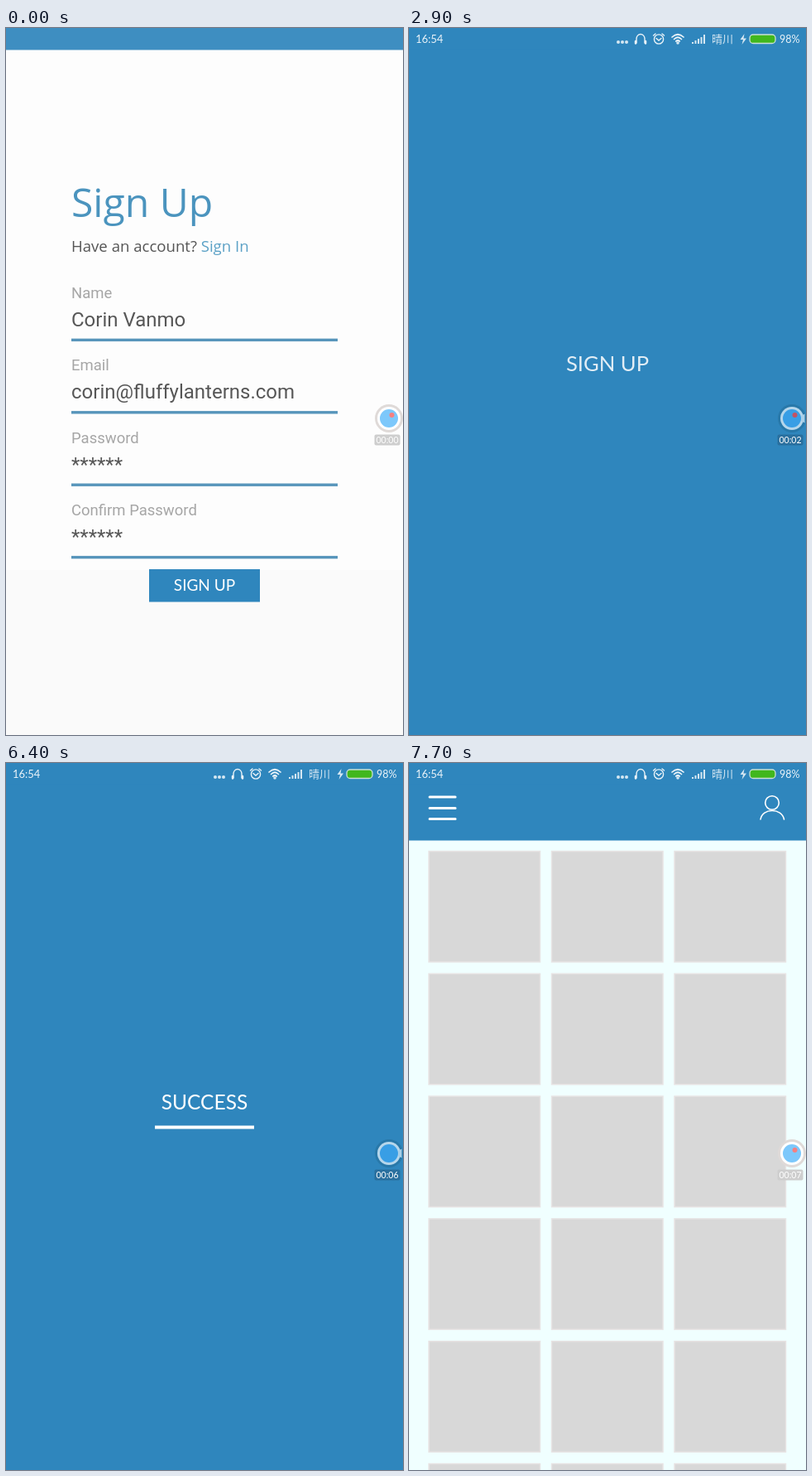
Animation, 480 px wide and 853 px high, one loop 7.8 s. Source, as an HTML page:

```html
<!DOCTYPE html>
<html lang="en">
<head>
<meta charset="utf-8">
<title>Sign up flow</title>
<style>
html, body { margin: 0; width: 100%; height: 100%; overflow: hidden; background: #fdfdfd; }
svg { display: block; width: 100%; height: 100%; }
text { white-space: pre; }
.ui { font-family: Lato, "Open Sans", sans-serif; fill: #fff; }
.head { font-family: "Open Sans", "Noto Sans", sans-serif; }
.field { font-family: Roboto, sans-serif; }
.mid { text-anchor: middle; }
.line { fill: none; stroke: #fff; stroke-linecap: round; }
</style>
</head>
<body>
<svg id="stage" viewBox="0 0 480 853">
  <rect id="back" width="480" height="853"/>
  <g id="tiles" fill="#d8d8d8" stroke="#e7e3e3" stroke-width="1.5"></g>

  <g id="form">
    <rect width="480" height="654" fill="#fdfdfd"/>
    <text class="head" x="79" y="228" font-size="48" fill="#4b94be">Sign Up</text>
    <text class="head" x="79" y="270" font-size="18.6" fill="#555">Have an account? <tspan fill="#5ba1c6">Sign In</tspan></text>
  </g>

  <rect id="button" fill="#2f86bd"/>
  <text id="buttonText" class="ui mid" x="240" y="679" font-size="19">SIGN UP</text>
  <rect id="panel" width="480" fill="#2f86bd"/>

  <g id="loading">
    <text id="signing" class="ui mid" font-size="24.5">SIGN UP</text>
    <text id="success" class="ui mid" x="240" y="418" font-size="24.5">SUCCESS</text>
    <rect id="bar" x="180" y="437.5" height="4" fill="#fff"/>
  </g>

  <g id="nav" class="line">
    <path d="M25 41H56M25 54.500H56M25 67.500H56" stroke-width="3"/>
    <circle cx="439" cy="48" r="8.300" stroke-width="1.600"/>
    <path d="M425 68C427 54 451 54 453.500 68" stroke-width="1.600"/>
  </g>

  <rect id="statusBar" width="480" height="26.5"/>
  <g id="status">
    <text class="ui" x="8" y="18" font-size="13">16:54</text>
    <g fill="#e8f2f8">
      <circle cx="253" cy="17" r="2"/><circle cx="258" cy="17" r="2"/><circle cx="263" cy="17" r="2"/>
      <path d="M405.500 7L400.500 14H404L402.500 20L408 12.500H404.500Z"/>
      <path d="M342 19v-2h2v2zM345.500 19v-4h2v4zM349 19v-6h2v6zM352.500 19v-8h2v8zM356 19v-11h2v11z"/>
      <circle cx="325" cy="18" r="1.800"/>
    </g>
    <g class="line" stroke-width="1.400">
      <path d="M275 18V13A5 5.500 0 0 1 285 13V18"/>
      <path d="M274 16V18.500M286 16V18.500" stroke-width="2.500"/>
      <circle cx="302" cy="13.500" r="5.600"/>
      <path d="M299 12.500L302 15L305 12.500M295.500 9L298 7M308.500 9L306 7"/>
      <path d="M318 11Q325 4.500 332 11M320.500 13.500Q325 9 329.500 13.500M322.800 16Q325 14 327.200 16" stroke-width="1.700"/>
    </g>
    <text x="366" y="18" font-size="13" fill="#e8f2f8" font-family="Noto Sans CJK SC, Noto Sans CJK, sans-serif">晴川</text>
    <rect x="412" y="8" width="31" height="10.500" rx="4" fill="#43bd0c" stroke="#dbead8" stroke-width="1.300"/>
    <text class="ui" x="448" y="17.500" font-size="12.5">98%</text>
  </g>

  <g id="recorder">
    <circle id="rim" cx="463" cy="471" r="17"/>
    <circle id="ring" cx="463" cy="471" r="14"/>
    <circle id="lens" cx="463" cy="471" r="11"/>
    <path id="grip" d="M474 468L478.500 465.500V476.500L474 474Z" fill="#a9cfe8"/>
    <circle id="dot" cx="466.500" cy="467" r="3"/>
    <rect id="plate" x="445.500" y="490.500" width="31" height="13" rx="2"/>
    <text id="clock" class="ui mid" x="461" y="500.800" font-size="10.5"></text>
  </g>
</svg>
<script>
const LOOP = 7800, STEP = 100;
const el = {};
document.querySelectorAll('[id]').forEach(node => el[node.id] = node);

const set = (node, attrs) => {
  for (const key in attrs) node.setAttribute(key, attrs[key]);
};
const add = (parent, tag, attrs, text = '') => {
  const node = document.createElementNS('http://www.w3.org/2000/svg', tag);
  set(node, attrs);
  node.textContent = text;
  parent.append(node);
};
const ramp = (t, from, to) => Math.min(1, Math.max(0, (t - from) / (to - from)));
const smooth = u => u * u * (3 - 2 * u);
const mix = (a, b, u) => a + (b - a) * u;

[['Name', 'Corin Vanmo'], ['Email', 'corin@fluffylanterns.com'],
 ['Password', '******'], ['Confirm Password', '******']].forEach(([label, value], i) => {
  const y = i * 87.4;
  add(el.form, 'text', { class: 'field', x: 79, y: 326 + y, 'font-size': 18.5, fill: '#a6a6a6' }, label);
  add(el.form, 'text', { class: 'field', x: 79, y: 360 + y, 'font-size': 24, fill: '#575757' }, value);
  add(el.form, 'rect', { x: 79, y: 374.7 + y, width: 322, height: 3.4, fill: '#5795bb' });
});

for (let i = 0; i < 18; i++) {
  add(el.tiles, 'rect', {
    x: 24 + i % 3 * 148.5, y: 106.5 + Math.floor(i / 3) * 147.8, width: 134.5, height: 133.5
  });
}

function drawButton(t) {
  const move = smooth(ramp(t, 850, 1100));
  const u = Math.max(0, (t - 1100) / 100);
  const radius = 40 + 37 * u + 8 * u * u;
  const w = mix(134, 2 * radius, move), h = mix(39.5, 2 * radius, move);
  set(el.button, {
    x: 240 - w / 2, y: mix(672.7, 400, move) - h / 2, width: w, height: h,
    rx: move * h / 2, opacity: t < 1800 ? 1 : 0
  });
  set(el.buttonText, { opacity: 1 - ramp(t, 850, 950) });
  set(el.form, { opacity: 1 - ramp(t, 850, 1050) });
}

function drawLoading(t) {
  const rest = 1 - ramp(t, 2600, 3030);
  const swap = ramp(t, 4850, 5150);
  set(el.signing, {
    transform: `translate(240 ${418 - 14 * rest}) scale(${1 + 0.15 * rest})`,
    opacity: ramp(t, 2600, 2950) * (1 - swap)
  });
  set(el.success, { opacity: swap });
  set(el.bar, { width: 120 * ramp(t, 3300, 4700) });
  set(el.loading, { opacity: 1 - ramp(t, 6500, 6800) });
}

function drawRecorder(t, onBlue) {
  const seconds = Math.max(0, t * 0.00097 - 0.05);
  const blink = t < 300 || seconds % 1 > 0.35;
  set(el.rim, { fill: onBlue ? '#2878a9' : '#dfdad8' });
  set(el.ring, { fill: onBlue ? '#b5d6eb' : '#fff' });
  set(el.lens, { fill: onBlue ? '#389ee5' : '#7dc8fb' });
  set(el.grip, { opacity: onBlue ? 1 : 0 });
  set(el.dot, { fill: onBlue ? '#c35264' : '#f57f80', opacity: blink ? 1 : 0 });
  set(el.plate, { fill: onBlue ? '#296f9e' : '#cecece' });
  set(el.clock, { fill: onBlue ? '#c2d7e5' : '#fff' });
  el.clock.textContent = '00:0' + Math.floor(seconds);
}

function draw(t) {
  const height = t < 1700 ? 0 : mix(853, 93.5, smooth(ramp(t, 7000, 7470)));
  const tint = t < 5000 ? ramp(t, 850, 1050) : ramp(t, 7200, 7600);
  const [r, g] = t < 5000 ? [mix(250, 245, tint), mix(250, 255, tint)] : [mix(254, 240, tint), 255];
  set(el.back, { fill: `rgb(${r},${g},${g})` });
  set(el.tiles, { opacity: t > 5000 ? 1 : 0 });
  set(el.panel, { height });
  set(el.nav, { opacity: ramp(t, 6900, 7300) });
  set(el.statusBar, { fill: t < 100 ? '#3e8ec1' : '#2f86bd' });
  set(el.status, { opacity: t < 100 ? 0 : 0.9 });
  drawButton(t);
  drawLoading(t);
  drawRecorder(t, t >= 1400 && (t < 1700 || height > 480));
}

const start = performance.now();
function tick() {
  const t = (performance.now() - start) % LOOP;
  draw(Math.floor(t / STEP) * STEP);
  requestAnimationFrame(tick);
}
tick();
</script>
</body>
</html>
```
